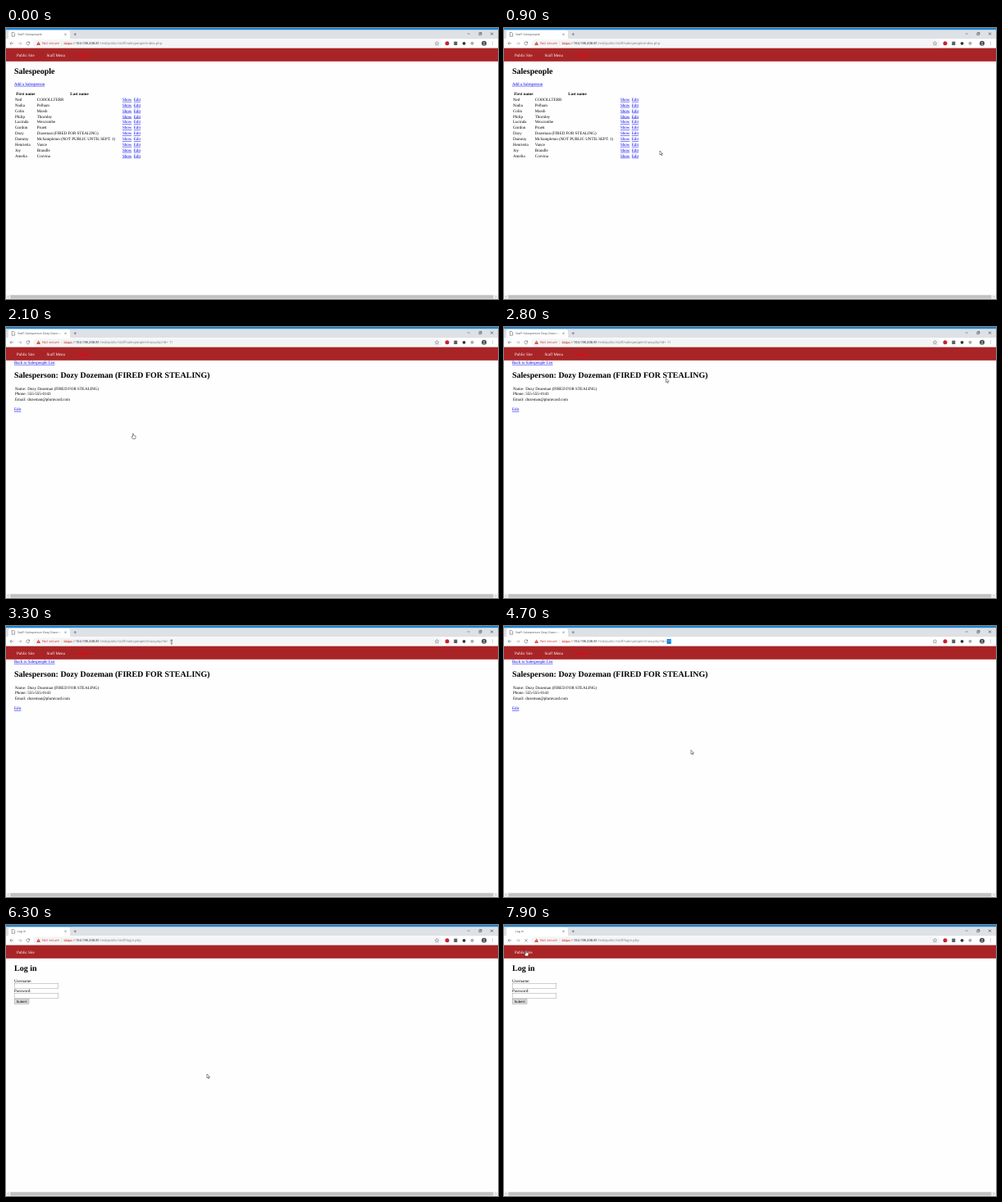
Animation, 600 px wide and 331 px high, one loop 8 s. Source, as an HTML page:

```html
<!DOCTYPE html>
<html lang="en">
<head>
<meta charset="utf-8">
<title>Staff pages</title>
<style>
html, body { margin: 0; height: 100%; overflow: hidden; background: #fff; }
svg { display: block; width: 100vw; height: 100vh; }
text { font: 5px "Liberation Serif", "Times New Roman", serif; fill: #000; text-rendering: geometricPrecision; white-space: pre; }
.h1 { font-size: 10px; font-weight: bold; }
.b { font-weight: bold; }
.mid { text-anchor: middle; }
.link { fill: #00e; text-decoration: underline; }
.nav { fill: #fff; }
.out { fill: #f00010; font-weight: bold; }
.ui { font: 4.15px "Open Sans", "Noto Sans", sans-serif; fill: #202124; }
.tab { font-size: 3.6px; fill: #45494d; }
.warn { fill: #d93025; }
.dim { fill: #75797e; }
.strike { fill: #d93025; text-decoration: line-through; }
.btn { font: 4.2px "Liberation Sans", Arial, sans-serif; }
.ln { fill: none; stroke: #5f6368; stroke-width: .6; }
.box { fill: #fff; stroke: #8a8a8a; stroke-width: .4; }
</style>
</head>
<body>
<svg id="stage" viewBox="0 0 600 331"></svg>
<script>
const LOOP = 8000, STEP = 100;
const text = (x, y, s, cls = '', id = '') => `<text x="${x}" y="${y}" class="${cls}" id="${id}">${s}</text>`;
const rect = (x, y, w, h, fill, more = '') => `<rect x="${x}" y="${y}" width="${w}" height="${h}" fill="${fill}" ${more}/>`;
const line = (d, more = '') => `<path class="ln" d="${d}" ${more}/>`;
const dot = (x, y, r, fill) => `<circle cx="${x}" cy="${y}" r="${r}" fill="${fill}"/>`;
const group = (id, ...parts) => `<g id="${id}">${parts.join('')}</g>`;

const people = [
  ['Ned', 'COOOLLTERR'], ['Nadia', 'Pelham'], ['Colin', 'Marsh'], ['Philip', 'Thornley'],
  ['Lucinda', 'Wexcombe'], ['Gordon', 'Pruett'], ['Dozy', 'Dozeman (FIRED FOR STEALING)'],
  ['Dummy', 'McSampleton (NOT PUBLIC UNTIL SEPT. 1)'], ['Henrietta', 'Vance'],
  ['Joy', 'Brandle'], ['Amelia', 'Corvina']
];
const fired = 'Dozy Dozeman (FIRED FOR STEALING)';

const frame = [
  rect(0, 0, 600, 331, '#fefefe'),
  rect(0, 0, 600, 14, '#dee1e6'),
  rect(0, 0, 600, 2.2, '#1b84d1'),
  '<path d="M1 14Q3 14 3 12V5Q3 3 5 3H76Q78 3 78 5V12Q78 14 80 14Z" fill="#fff"/>',
  rect(0, 13.2, 600, 11.4, '#fff'),
  rect(33, 14.3, 499, 9.2, '#f4f5f6', 'rx="4.6" id="pill"'),
  group('favicon', line('M7.2 5.4H9.3L10.6 6.7V10.2H7.2Z', 'stroke-width=".45"')),
  text(14, 9, '', 'ui tab', 'title'),
  '<linearGradient id="fade"><stop stop-color="#fff" stop-opacity="0"/><stop offset="1" stop-color="#fff"/></linearGradient>',
  rect(61, 4, 6.5, 7, 'url(#fade)'), rect(67.4, 4, 10, 8, '#fff'),
  line('M71.4 6.6L73.6 8.8M73.6 6.6L71.4 8.8'),
  line('M82.6 7.7H86M84.3 6V9.4'),
  line('M562.5 7H565.8'),
  line('M576.8 6.3H579.2V8.7H576.8ZM577.6 6.2V5.4H580V7.8H579.3', 'style="stroke:#222;stroke-width:.45"'),
  line('M591 5.6L594 8.6M594 5.6L591 8.6', 'style="stroke:#222"'),
  line('M9 18.8H5M6.8 16.9L4.9 18.8L6.8 20.7'),
  line('M15 18.8H19M17.2 16.9L19.1 18.8L17.2 20.7', 'id="forward"'),
  group('reload', line('M28.4 17.4A2 2 0 1 0 28.8 19.4'), '<path d="M29 16.4V18.5H26.9Z" fill="#5f6368"/>'),
  group('stop', line('M25.4 17.2L28.6 20.4M28.6 17.2L25.4 20.4')),
  group('chip',
    '<path d="M39.6 16.4L42 20.8H37.2Z" fill="#d93025"/>', rect(39.35, 17.8, .5, 1.3, '#fff'), rect(39.35, 19.5, .5, .5, '#fff'),
    text(44, 20.4, 'Not secure', 'ui warn'), line('M67.6 16.6V21', 'style="stroke:#ccc;stroke-width:.4"')),
  group('globe', line('M41.6 18.8A2 2 0 1 1 37.6 18.8A2 2 0 1 1 41.6 18.8M37.6 18.8H41.6M39.6 16.8V20.8', 'style="stroke-width:.4"')),
  group('url',
    '<text x="70.5" y="20.4" class="ui"><tspan class="strike">https</tspan><tspan class="dim">://</tspan>104.198.208.81<tspan class="dim" id="path"></tspan></text>',
    rect(198.6, 16, 5.2, 5.8, '#0078d7', 'id="sel"'),
    text(198.9, 20.4, '', 'ui dim', 'num')),
  group('star', line('M525.5 16.4L526.2 18.1L528 18.2L526.6 19.4L527.1 21.1L525.5 20.1L523.9 21.1L524.4 19.4L523 18.2L524.8 18.1Z', 'style="stroke-width:.45"')),
  dot(538, 18.8, 2.5, '#c8232c'),
  rect(546.3, 16.6, 4, 4.4, '#5a5d61'),
  dot(558.6, 18.8, 1.9, '#333'),
  dot(568.5, 18.8, 2, '#a9acb0'),
  dot(583, 18.8, 3, '#45494e'), dot(583, 18, 1, '#aeb2b6'),
  '<path d="M581.2 20.7Q583 18.5 584.8 20.7Z" fill="#aeb2b6"/>',
  [17, 18.8, 20.6].map(y => dot(593.2, y, .45, '#5f6368')).join(''),
  rect(0, 24.6, 600, 16.2, '#a92427'),
  text(13, 34.6, 'Public Site', 'nav'),
  group('staffNav', text(49.5, 34.6, 'Staff Menu', 'nav'), text(87, 34.6, 'Logout', 'out')),
  rect(0, 325.7, 600, 5.3, '#f1f1f1'),
  rect(5.3, 326.3, 589, 4.2, '#c1c1c1'),
  line('M3.2 327.3L2.2 328.3L3.2 329.3M596.8 327.3L597.8 328.3L596.8 329.3', 'style="stroke-width:.5"')
];

const list = group('list',
  text(10, 56, 'Salespeople', 'h1'),
  text(10, 69.8, 'Add a Salesperson', 'link'),
  text(23.8, 82, 'First name', 'b mid'), text(89.5, 82, 'Last name', 'b mid'),
  ...people.map(([first, last], i) => {
    const y = 88.9 + i * 6.875;
    return text(11, y, first) + text(37.8, y, last) + text(141.9, y, 'Show', 'link') + text(155.8, y, 'Edit', 'link');
  }));

const show = group('show',
  text(10, 44.9, 'Back to Salespeople List', 'link'),
  text(10, 61.8, 'Salesperson: ' + fired, 'h1'),
  ...[['Name:', fired], ['Phone:', '555-555-0143'], ['Email:', 'dozeman@plumvard.com']].map(
    ([k, v], i) => text(11, 76.5 + i * 6.875, k) + text(26.2, 76.5 + i * 6.875, v)),
  text(10, 102.1, 'Edit', 'link'));

const field = y => `<rect class="box" x="10.2" y="${y}" width="53.6" height="6.2"/>`;
const login = group('login',
  text(10, 56, 'Log in', 'h1'),
  text(10, 69.8, 'Username:'), field(71.2),
  text(10, 82, 'Password:'), field(83.2),
  rect(10.2, 90.3, 17.8, 6, '#ddd', 'stroke="#8a8a8a" stroke-width=".4"'),
  text(19.1, 94.8, 'Submit', 'btn mid'));

const cursor = group('cursor',
  '<path id="arrow" d="M0 0V5L1.2 3.9L2 5.7L2.8 5.4L2 3.6H3.6Z" fill="#fff" stroke="#111" stroke-width=".45"/>',
  '<path id="hand" d="M-.6 .4Q0-.4 .6 .4V2.4L2.9 3Q3.3 3.2 3.2 4L2.6 6.6H-.6L-2 4.2Q-1.6 3.4-.6 4.2Z" fill="#fff" stroke="#111" stroke-width=".45"/>',
  '<path id="beam" d="M-1-2.5H1M0-2.5V2.5M-1 2.5H1" fill="none" stroke="#222" stroke-width=".5"/>');

document.getElementById('stage').innerHTML = frame.join('') + list + show + login + cursor;

const $ = id => document.getElementById(id);
const vis = (id, on) => { $(id).style.display = on ? '' : 'none'; };

// time, x, y of the pointer tip
const track = [
  [100, 262, 247], [900, 190, 150], [1500, 147, 128.5], [1800, 147, 128.5], [2100, 155, 130],
  [2400, 170, 164], [2700, 196, 78], [3000, 202, 19.5], [4400, 202, 19.5], [4700, 228, 151.5],
  [6100, 228, 151.5], [6300, 245, 182], [6500, 245, 182], [6900, 42, 50], [7500, 26.8, 31.3], [8000, 26.8, 31.3]
];
function pointer(t) {
  const i = Math.max(1, track.findIndex(k => k[0] > t));
  const [t0, x0, y0] = track[i - 1], [t1, x1, y1] = track[i];
  const u = Math.max(0, (t - t0) / (t1 - t0)), e = u * u * (3 - 2 * u);
  return [x0 + (x1 - x0) * e, y0 + (y1 - y0) * e];
}

const titles = { list: 'Staff: Salespeople', show: 'Staff: Salesperson Dozy Dozeman', login: 'Log in' };
const paths = { list: 'salespeople/index.php', show: 'salespeople/show.php?id=', login: 'login.php' };

function draw(t) {
  const page = t < 2000 ? 'list' : t < 6200 ? 'show' : 'login';
  const typing = t >= 5200 && t < 5700;
  const loading = t >= 1800 && t < 2000 || t >= 5700 && t < 6200 || t >= 7800;
  const selected = t >= 4400 && t < 5200;
  for (const p in titles) vis(p, p === page);
  vis('staffNav', page !== 'login');
  $('title').textContent = titles[page];
  $('path').textContent = '/red/public/staff/' + paths[page];
  $('num').textContent = page !== 'show' ? '' : t < 5200 ? '11' : t < 5400 ? '1' : '10';
  $('num').style.fill = selected ? '#fff' : '';
  vis('sel', selected);
  $('pill').setAttribute('fill', t >= 4400 && t < 5700 ? '#fff' : '#f4f5f6');
  $('url').setAttribute('transform', `translate(${typing ? -26.5 : 0} 0)`);
  vis('chip', !typing);
  vis('star', !typing);
  vis('globe', typing);
  vis('favicon', !loading);
  vis('reload', !loading);
  vis('stop', loading);
  $('forward').style.stroke = '#a0a3a7';

  const [x, y] = pointer(t);
  const hand = t >= 1400 && t < 2200 || t >= 7200;
  const beam = y < 24;
  vis('cursor', t >= 100 && (t < 5200 || t >= 6100));
  $('cursor').setAttribute('transform', `translate(${x} ${y})`);
  vis('hand', hand);
  vis('beam', beam);
  vis('arrow', !hand && !beam);
}

const start = performance.now();
function tick(now) {
  const t = Math.max(0, now - start) % LOOP;
  draw(Math.floor(t / STEP) * STEP);
  requestAnimationFrame(tick);
}
draw(0);
requestAnimationFrame(tick);
</script>
</body>
</html>
```
